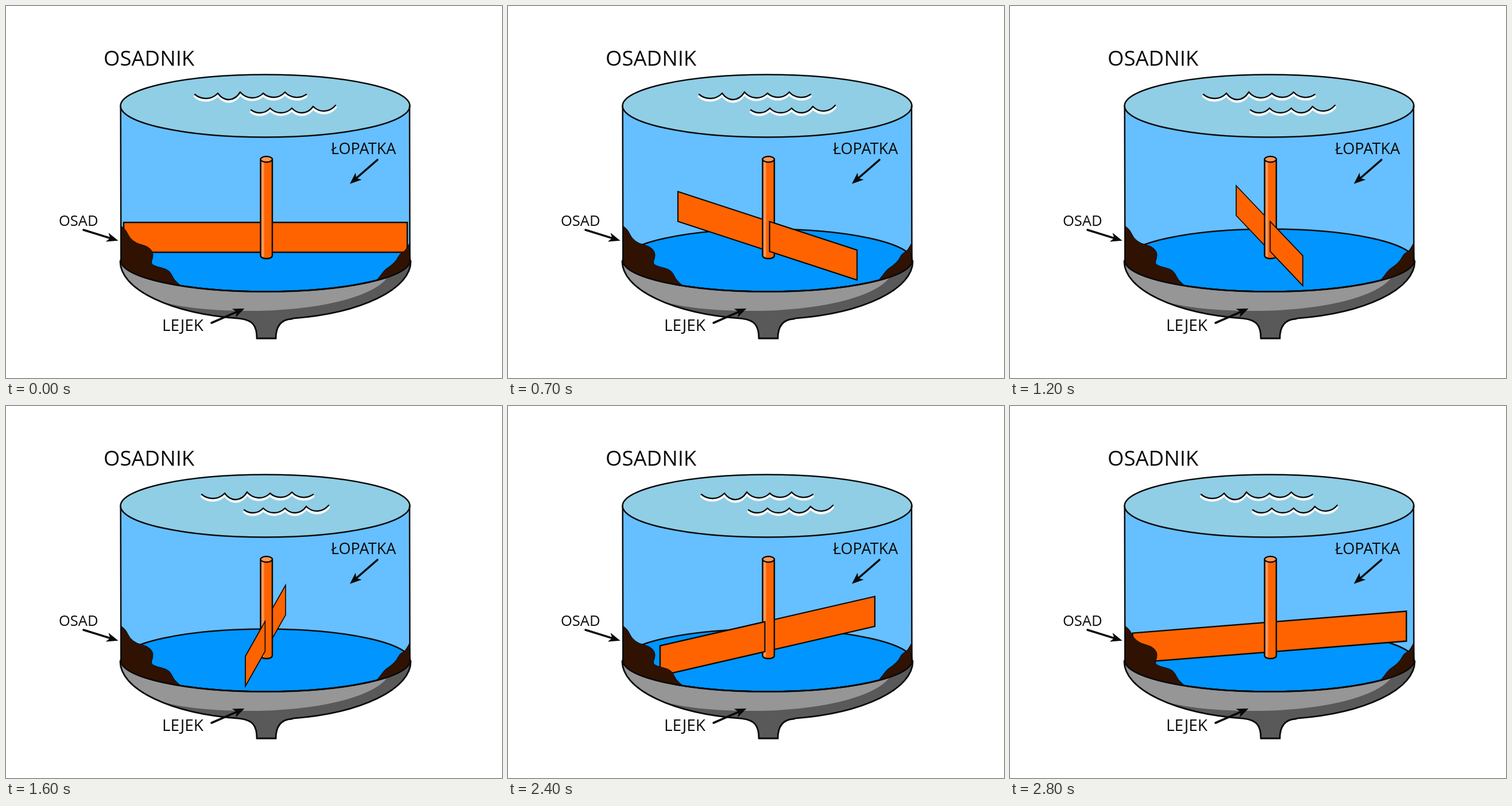
Recreate the animation shown at these times as an HTML page with a canvas. Size 864x648 px, loop 2.9 s.

```html
<!DOCTYPE html>
<html lang="pl">
<head>
<meta charset="utf-8">
<title>Osadnik</title>
<style>
  html, body { margin: 0; width: 100%; height: 100%; overflow: hidden; background: #fff; }
  canvas { display: block; }
</style>
</head>
<body>
<canvas id="stage" width="864" height="648"></canvas>
<script>
const ctx = document.getElementById('stage').getContext('2d');
const TICK = 100, TICKS = 29, TAU = Math.PI * 2;
const INK = '#0a0a0a', ORANGE = '#ff6300', BROWN = '#301203';
const AXIS = 452, RX = 252, RY = 54.5, TOP = 174, FLOOR = 443;

// Blade tip relative to the axis: tick, dx, dy
const TIP = [
  [0, 247, 0], [1, 238, 19], [5, 187, 43.5], [7, 156, 51], [12, 58, 61],
  [16, -35, 62], [20, -122, 55.5], [24, -187, 43], [28, -238.5, 19]
];
const LEFT_MUD = [[200, 383], [208, 388], [215, 404], [228, 414], [246, 418], [256, 428],
  [256, 438], [252, 449], [262, 454], [280, 458], [288, 466], [292, 476], [303, 486]];
const RIGHT_MUD = [[703, 413], [696, 427], [686, 431], [681, 442], [671, 452], [660, 459],
  [655, 466], [647, 476]];
// Crests of each wave with the depth of the trough that follows
const UPPER_WAVE = [[329, 154, 161], [369, 152, 163], [408, 150, 160], [448, 152, 159], [486, 150, 159], [523, 154]];
const LOWER_WAVE = [[427, 181, 186], [460, 178, 186], [498, 178, 186], [535, 175, 183], [574, 173]];

function paint(fill, width, color = INK) {
  if (fill) { ctx.fillStyle = fill; ctx.fill(); }
  if (width) { ctx.strokeStyle = color; ctx.lineWidth = width; ctx.stroke(); }
}

function ellipse(x, y, rx, ry, from = 0, to = TAU) {
  ctx.beginPath();
  ctx.ellipse(x, y, rx, ry, 0, from, to);
}

function polygon(points, fill, width) {
  ctx.beginPath();
  points.forEach(([x, y]) => ctx.lineTo(x, y));
  ctx.closePath();
  paint(fill, width);
}

// Nonuniform cubic Hermite through the tip keys
function tipAt(tick) {
  let i = 0;
  while (i < TIP.length - 2 && TIP[i + 1][0] <= tick) i++;
  const a = TIP[i], b = TIP[i + 1];
  const before = TIP[Math.max(i - 1, 0)], after = TIP[Math.min(i + 2, TIP.length - 1)];
  const span = b[0] - a[0], t = (tick - a[0]) / span;
  return [1, 2].map(k => {
    const m0 = (b[k] - before[k]) / (b[0] - before[0]) * span;
    const m1 = (after[k] - a[k]) / (after[0] - a[0]) * span;
    return (1 - t) ** 2 * ((1 + 2 * t) * a[k] + t * m0)
      + t * t * ((3 - 2 * t) * b[k] + (t - 1) * m1);
  });
}

function drawTank() {
  ctx.beginPath();
  ctx.rect(200, TOP, 503, FLOOR - TOP);
  paint('#66bfff');
  ellipse(AXIS, FLOOR, RX, RY);
  paint('#0095ff', 2.5);
  ellipse(451.5, TOP, RX, RY);
  paint('#8fcee5', 2.5);
}

function bowlPath() {
  ctx.beginPath();
  ctx.ellipse(AXIS, 445, 253, 101, 0, Math.PI, 1.75, true);
  ctx.bezierCurveTo(430, 547, 437, 557, 437, 579);
  ctx.lineTo(470, 579);
  ctx.bezierCurveTo(470, 558, 479, 546, 498, 545);
  ctx.ellipse(AXIS, 445, 253, 101, 0, 1.38, 0, true);
  ctx.ellipse(AXIS, FLOOR, RX, RY, 0, 0, Math.PI);
  ctx.closePath();
}

function drawBowl() {
  bowlPath();
  paint('#595959');
  ctx.save();
  ctx.clip();
  ctx.beginPath();
  ctx.moveTo(190, 430);
  ctx.lineTo(190, 480);
  ctx.lineTo(233, 501);
  ctx.bezierCurveTo(280, 526, 365, 532, 440, 531);
  ctx.bezierCurveTo(545, 529, 641, 507, 665, 472);
  ctx.lineTo(665, 430);
  paint('#969696');
  ctx.restore();
  bowlPath();
  paint(null, 2.8);
}

function drawPost() {
  ctx.beginPath();
  ctx.moveTo(443.5, 267);
  ctx.lineTo(443.5, 435);
  ctx.ellipse(453.7, 435, 10.2, 5, 0, Math.PI, 0, true);
  ctx.lineTo(463.9, 267);
  ctx.closePath();
  paint(ORANGE);
  ctx.fillStyle = '#ff9654';
  ctx.fillRect(444, 268, 5.5, 169);
  paint(null, 2.5);
  ellipse(453.7, 267, 10.2, 5);
  paint('#ff9654', 2.3);
}

function drawBlade(x1, x2, y, slope, width) {
  const edge = x => y + (x - AXIS) * slope;
  polygon([[x1, edge(x1)], [x2, edge(x2)], [x2, edge(x2) + 52], [x1, edge(x1) + 52]], ORANGE, width);
}

function drawPaddle(tick) {
  const [dx, dy] = tipAt(tick);
  const reach = Math.abs(dx) / 247;
  const y = 374 + 3 * reach ** 5, slope = dy / dx, width = 1.5 + reach;
  drawBlade(AXIS - dx, AXIS + dx, y, slope, width);
  drawPost();
  if (dy > 21) drawBlade(459 - tick * 0.48, AXIS + dx, y, slope, width);
}

function drawMud(points, from, to, anticlockwise) {
  ctx.beginPath();
  ctx.moveTo(...points[0]);
  for (let i = 1; i < points.length - 1; i++) {
    const [x, y] = points[i], [nx, ny] = points[i + 1];
    ctx.quadraticCurveTo(x, y, (x + nx) / 2, (y + ny) / 2);
  }
  ctx.lineTo(...points[points.length - 1]);
  ctx.ellipse(AXIS, FLOOR, RX, RY, 0, from, to, anticlockwise);
  ctx.closePath();
  paint(BROWN, 1);
}

function drawRim() {
  ellipse(AXIS, FLOOR, RX, RY, 0, Math.PI);
  paint(null, 2.5);
  ctx.beginPath();
  ctx.moveTo(199.7, TOP);
  ctx.lineTo(200.3, FLOOR + 3);
  ctx.moveTo(703, TOP);
  ctx.lineTo(703.5, FLOOR + 3);
  paint(null, 2.5);
}

function drawWave(crests, shift) {
  const trace = (dy, width, color) => {
    ctx.beginPath();
    ctx.moveTo(crests[0][0] + shift, crests[0][1] + dy);
    for (let i = 1; i < crests.length; i++) {
      const [px, py, trough] = crests[i - 1], [x, y] = crests[i];
      const control = (8 * trough - py - y) / 6 + dy, inset = (x - px) * 0.28;
      ctx.bezierCurveTo(px + inset + shift, control, x - inset + shift, control, x + shift, y + dy);
    }
    paint(null, width, color);
  };
  trace(3.5, 4.5, '#f4faff');
  trace(0, 2.4, INK);
}

function drawArrow(x1, y1, x2, y2) {
  const angle = Math.atan2(y2 - y1, x2 - x1);
  ctx.beginPath();
  ctx.moveTo(x1, y1);
  ctx.lineTo(x2 - 8 * Math.cos(angle), y2 - 8 * Math.sin(angle));
  paint(null, 3.6);
  ctx.save();
  ctx.translate(x2, y2);
  ctx.rotate(angle);
  polygon([[0, 0], [-15, -6], [-11, 0], [-15, 6]], INK, 2);
  ctx.restore();
}

function label(text, x, y, size) {
  ctx.font = `${size}px "Open Sans", "Noto Sans", sans-serif`;
  ctx.fillStyle = INK;
  ctx.fillText(text, x, y);
}

function drawLabels() {
  label('OSADNIK', 170, 104, 36.5);
  label('ŁOPATKA', 566, 258, 27);
  label('OSAD', 92, 383, 25.5);
  label('LEJEK', 272, 566, 28);
  drawArrow(135, 390, 193, 408);
  drawArrow(647, 268, 601, 308);
  drawArrow(358, 552, 413, 528);
}

function draw(time) {
  const tick = Math.floor(time / TICK) % TICKS;
  const step = Math.floor(tick / 5);
  const drift = 4 * Math.min(step, 6 - step);
  ctx.fillStyle = '#fff';
  ctx.fillRect(0, 0, 864, 648);
  ctx.lineCap = 'round';
  ctx.lineJoin = 'miter';
  drawTank();
  drawBowl();
  drawPaddle(tick);
  drawMud(LEFT_MUD, 2.21, Math.PI, false);
  drawMud(RIGHT_MUD, 0.68, 0, true);
  drawRim();
  drawWave(UPPER_WAVE, drift);
  drawWave(LOWER_WAVE, -drift);
  drawLabels();
}

const start = performance.now();
function loop() {
  draw(performance.now() - start);
  requestAnimationFrame(loop);
}
loop();
</script>
</body>
</html>
```
